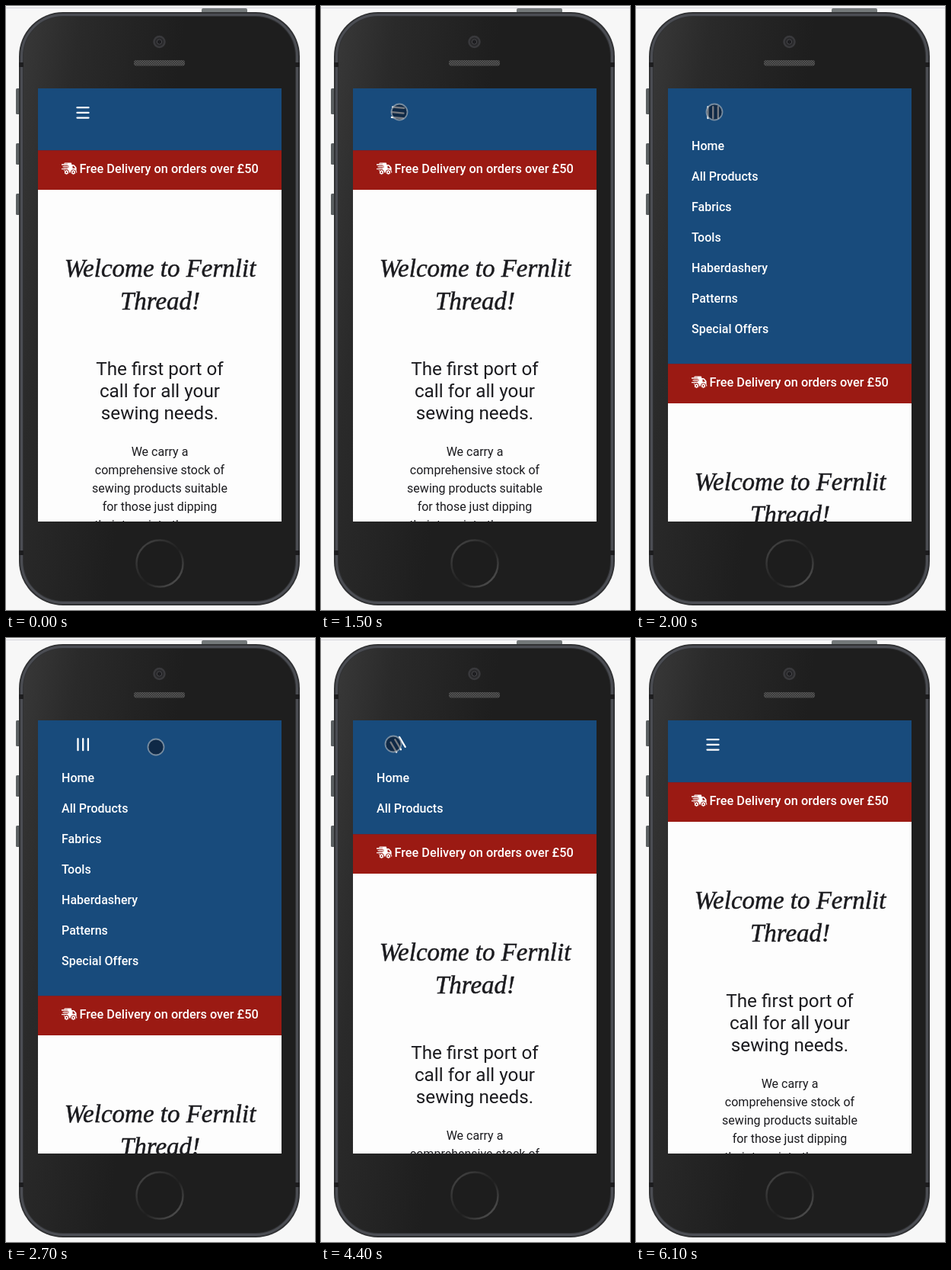
An HTML page for the animation above (6.4 s loop, 406 px wide and 792 px high).

```html
<!DOCTYPE html>
<html lang="en">
<head>
<meta charset="utf-8">
<style>
  html, body { margin: 0; width: 100%; height: 100%; overflow: hidden; background: #f7f7f7; }
  svg { display: block; }
  text { font-family: Roboto, sans-serif; font-size: 16px; fill: #1b1b1f; }
  .light text { fill: #fff; font-weight: 500; }
  .centred { text-anchor: middle; }
  .script text { font: italic 33px "Liberation Serif", serif; stroke: #1b1b1f; stroke-width: .5px; }
  .lead text { font-size: 24.3px; }
</style>
</head>
<body>
<svg width="406" height="792" viewBox="0 0 406 792">
  <defs>
    <linearGradient id="body" x2=".55" y2=".16">
      <stop stop-color="#383838"/><stop offset=".35" stop-color="#2a2a2a"/><stop offset="1" stop-color="#1e1e1e"/>
    </linearGradient>
    <linearGradient id="ring" x2="1" y2="1">
      <stop stop-color="#4c4c4c"/><stop offset=".3" stop-color="#303030"/>
      <stop offset=".55" stop-color="#202020"/><stop offset="1" stop-color="#5c5c5c"/>
    </linearGradient>
    <pattern id="mesh" width="3" height="3" patternUnits="userSpaceOnUse">
      <rect width="3" height="3" fill="#303030"/><path d="M0 0h1.5v1.5h1.5v1.5h-1.5v-1.5h-1.5z" fill="#5c5c5c"/>
    </pattern>
    <clipPath id="screen"><rect x="42" y="108" width="320" height="568"/></clipPath>
    <clipPath id="menuClip"><rect id="menuBox" x="42" y="164" width="320" height="0"/></clipPath>
  </defs>

  <path d="M0 2.5H406" stroke="#d2d0d8"/>
  <g fill="#5b5f61">
    <rect x="257" y="3" width="60" height="8" rx="2" fill="#737879"/>
    <rect x="13" y="108" width="7" height="34" rx="1.5"/>
    <rect x="13" y="180" width="7" height="28" rx="1.5"/>
    <rect x="13" y="246" width="7" height="28" rx="1.5"/>
  </g>
  <rect x="17" y="8" width="369" height="778" rx="58" fill="#303133"/>
  <rect x="20.5" y="11.5" width="362" height="771" rx="54.5" fill="none" stroke="#4b4d53" stroke-width="3"/>
  <path d="M17 77H24M379 77H386M17 717H24M379 717H386" stroke="#1d1d1f" stroke-width="6"/>
  <rect x="23" y="14" width="357" height="766" rx="52" fill="url(#body)"/>
  <circle cx="201.5" cy="47" r="7" fill="#28282a" stroke="#39393c" stroke-width="2.5"/>
  <circle cx="201.5" cy="47" r="3.2" fill="#1d1d20" stroke="#48484b"/>
  <rect x="168" y="71" width="67" height="7.5" rx="3" fill="url(#mesh)"/>
  <circle cx="202" cy="731" r="30.5" fill="#1d1d1d" stroke="url(#ring)" stroke-width="2.5"/>

  <g clip-path="url(#screen)">
    <rect x="42" y="108" width="320" height="568" fill="#184b7c"/>
    <g id="menu" class="light" clip-path="url(#menuClip)"></g>
    <g id="page">
      <rect x="42" y="189" width="320" height="52" fill="#9b1a13"/>
      <path d="M42 189.5H362" stroke="#7c2025"/>
      <rect x="42" y="241" width="320" height="600" fill="#fdfdfd"/>
      <g fill="#fff">
        <path d="M76 207q0-1.5 1.5-1.5h7.5q1.2 0 1.2 1.2V208h2.2q.8 0 1.3.5l2.3 2.4q.6.6.6 1.4V217h.6v1.6H76z"/>
        <path d="M73 208h8M74.500 210.800h8M73 213.600h8" stroke="#9b1a13" stroke-width="2.600"/>
        <path d="M73 208h8M74.500 210.800h8M73 213.600h8" stroke="#fff" stroke-width="1.300"/>
        <path d="M87.500 209.500h1l2.200 2.500v.7h-3.200z" fill="#9b1a13"/>
        <g stroke="#9b1a13"><circle cx="79.500" cy="218" r="3.200"/><circle cx="88.500" cy="218" r="3.200"/></g>
        <g fill="#9b1a13"><circle cx="79.500" cy="218" r="1.100"/><circle cx="88.500" cy="218" r="1.100"/></g>
      </g>
      <g class="light"><text x="96.500" y="219" style="font-size:16.300px">Free Delivery on orders over £50</text></g>
      <g class="centred">
        <g class="script">
          <text x="202.500" y="355">Welcome to Fernlit</text>
          <text x="202.500" y="398">Thread!</text>
        </g>
        <g class="lead">
          <text x="202" y="484">The first port of</text>
          <text x="202" y="513">call for all your</text>
          <text x="202" y="542">sewing needs.</text>
        </g>
        <text x="202" y="590">We carry a</text>
        <text x="202" y="614">comprehensive stock of</text>
        <text x="202" y="638">sewing products suitable</text>
        <text x="202" y="662">for those just dipping</text>
        <text x="202" y="686">their toes into the ocean</text>
      </g>
    </g>
    <path id="bars" d="M93.500 133.200h15M93.500 139.900h15M93.500 146.600h15" stroke="#fff" stroke-width="2.300" stroke-linecap="round"/>
    <circle id="cursor" r="10.500" fill="#0a0f19" fill-opacity=".55" stroke="#a0acb8" stroke-opacity=".7" stroke-width="1.800"/>
  </g>
</svg>
<script>
const LOOP = 6400, STEP = 100, LAST = 6100;
const ITEMS = ["Home", "All Products", "Fabrics", "Tools", "Haberdashery", "Patterns", "Special Offers"];
const ROW = 40;
const $ = id => document.getElementById(id);
const clamp = v => Math.min(1, Math.max(0, v));

// Pointer stops: time, x, y
const TRAIL = [
  [500, 376, 390], [900, 190, 190], [1300, 103, 139], [2200, 103, 139], [2700, 197, 143],
  [3050, 236, 148], [3500, 90, 141], [3700, 78, 140], [3900, 78, 140], [4250, 95, 139],
  [5000, 95, 139], [5600, 280, 355], [6100, 290, 690]
];

$("menu").innerHTML = ITEMS.map((name, i) => `<text x="73" y="${189 + i * ROW}">${name}</text>`).join("");

// CSS "ease": cubic-bezier(.25, .1, .25, 1)
function ease(x) {
  x = clamp(x);
  const curve = (a, b, s) => 3 * a * s * (1 - s) ** 2 + 3 * b * s * s * (1 - s) + s ** 3;
  let low = 0, high = 1;
  for (let i = 0; i < 24; i++) {
    const mid = (low + high) / 2;
    if (curve(.25, .25, mid) < x) low = mid; else high = mid;
  }
  return curve(.1, 1, high);
}

function pointerAt(t) {
  const next = TRAIL.findIndex(stop => stop[0] > t);
  if (next < 1) return null;
  const [t0, x0, y0] = TRAIL[next - 1], [t1, x1, y1] = TRAIL[next];
  const p = (t - t0) / (t1 - t0), k = p * p * (3 - 2 * p);
  return [x0 + (x1 - x0) * k, y0 + (y1 - y0) * k];
}

function draw(t) {
  const shift = ITEMS.length * ROW * (ease((t - 1500) / 350) - ease((t - 4240) / 350));
  const angle = 90 * (clamp((t - 1470) / 500) - clamp((t - 4230) / 500));
  $("menuBox").setAttribute("height", shift);
  $("page").setAttribute("transform", `translate(0 ${Math.round(shift)})`);
  $("bars").setAttribute("transform", `rotate(${angle} 101.2 139.9)`);
  const pos = pointerAt(t);
  $("cursor").setAttribute("visibility", pos ? "visible" : "hidden");
  if (pos) $("cursor").setAttribute("transform", `translate(${pos})`);
}

const start = performance.now();
function tick() {
  const t = (performance.now() - start) % LOOP;
  draw(Math.min(LAST, Math.floor(t / STEP) * STEP));
  requestAnimationFrame(tick);
}
tick();
</script>
</body>
</html>
```
